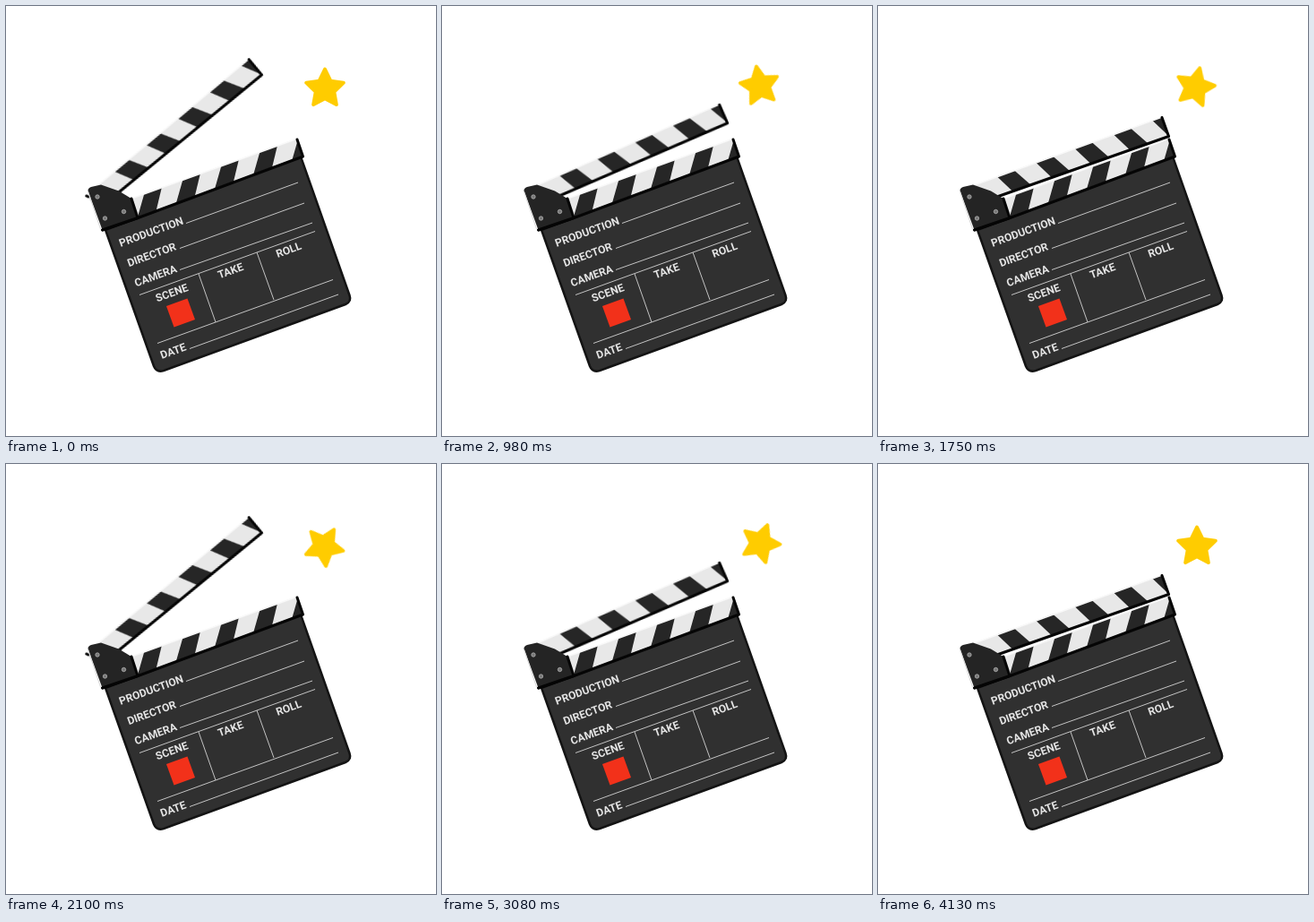
These frames come from a looping animation (480x480 px, 4.2 s). An HTML page:

```html
<!DOCTYPE html>
<html lang="en">
<head>
<meta charset="utf-8">
<title>Clapperboard</title>
<style>
  html, body { margin: 0; width: 100%; height: 100%; overflow: hidden; background: #fff; }
  svg { display: block; width: 100vw; height: 100vh; }
  .arm {
    transform-origin: 110.5px 222px;
    animation: clap 4200ms steps(5, end) infinite;
  }
  .star {
    transform-origin: 356px 90.5px;
    animation: spin 4200ms steps(60, jump-none) infinite;
  }
  /* Eleven swings, then the arm rests closed */
  @keyframes clap {
    0%, 16.66667%, 33.33333%, 50%, 66.66667%, 83.33333% { transform: rotate(-20deg); }
    8.33333%, 25%, 41.66667%, 58.33333%, 75%, 91.66667%, 100% { transform: rotate(0deg); }
  }
  @keyframes spin {
    from { transform: rotate(0deg); }
    to { transform: rotate(3600deg); }
  }
  .labels {
    font: 700 12.1px Roboto, "Liberation Sans", sans-serif;
    fill: #e4e4e4;
    text-anchor: middle;
  }
  .rules { stroke: #c4c4c4; stroke-width: 1; fill: none; }
  .white { fill: #e8e8e8; }
  .black { fill: #262626; }
  .edge { fill: none; stroke: #050505; stroke-width: 3; stroke-linejoin: round; stroke-linecap: round; }
  .shine { fill: none; stroke: #f9f9f9; stroke-width: 1.5; }
</style>
</head>
<body>
<svg viewBox="0 0 480 480">
  <defs>
    <path id="armShape" d="M94 204.500 L317.500 123.500 L325.500 145 L101 225 Z"/>
    <path id="barShape" d="M138 215.500 L324.500 148 L331.500 167 L146 236 Z"/>
    <clipPath id="armClip"><use href="#armShape"/></clipPath>
    <clipPath id="barClip"><use href="#barShape"/></clipPath>
    <path id="armStripe" d="M132 189.500 L151 182.500 L171 200 L152 208.500 Z"/>
    <path id="barStripe" d="M154.500 209 L174 202 L167.500 229 L146.500 237 Z"/>
  </defs>

  <path d="M111 250 L329 168 L383.500 323 Q386 330 379 333 L176 407 Q168 409.500 165 402 Z"
        fill="#303030" stroke="#141414" stroke-width="2.500"/>

  <path class="rules" d="M201 242.500 L326 197 M194 270.500 L333 220 M194 294.500 L342 242
    M149 322.500 L345 251.500 M215 299 L234 353 M280 275 L299 328
    M169 376.500 L365 305.500 M205 382.500 L371 322"/>

  <g class="labels">
    <text transform="translate(162 252) rotate(-20)" dy=".355em">PRODUCTION</text>
    <text transform="translate(162.500 277.500) rotate(-20)" dy=".355em">DIRECTOR</text>
    <text transform="translate(167 301) rotate(-20)" dy=".355em">CAMERA</text>
    <text transform="translate(185 320) rotate(-20)" dy=".355em">SCENE</text>
    <text transform="translate(250.500 295.500) rotate(-20)" dy=".355em">TAKE</text>
    <text transform="translate(315.500 272) rotate(-20)" dy=".355em">ROLL</text>
    <text transform="translate(186.500 385) rotate(-20)" dy=".355em">DATE</text>
  </g>

  <rect x="-12.500" y="-12.500" width="25" height="25" fill="#f2311a"
        transform="translate(195 342.500) rotate(-20)"/>

  <g>
    <use href="#barShape" class="white"/>
    <g class="black" clip-path="url(#barClip)">
      <use href="#barStripe"/>
      <use href="#barStripe" x="43" y="-15.500"/>
      <use href="#barStripe" x="86" y="-31"/>
      <use href="#barStripe" x="129" y="-46.500"/>
      <use href="#barStripe" x="172" y="-62"/>
    </g>
    <path class="shine" d="M140 215 L324 148.500"/>
    <path class="edge" d="M108 250 L146 237 L331.500 168 L325 149"/>
  </g>

  <g class="arm">
    <use href="#armShape" class="white"/>
    <g class="black" clip-path="url(#armClip)">
      <use href="#armStripe"/>
      <use href="#armStripe" x="43.500" y="-15.500"/>
      <use href="#armStripe" x="87" y="-31"/>
      <use href="#armStripe" x="130.500" y="-46.500"/>
      <use href="#armStripe" x="174" y="-62"/>
    </g>
    <path class="shine" d="M95 204.500 L317 124"/>
    <path class="edge" d="M130 214 L324.500 145.500 L317 124.500 M94.500 205.500 L96 207"/>
  </g>

  <path d="M91.500 206 Q91.500 203.500 95 202 L106 199.500 L126 206.500 L140 215 L147 236.500 L107.500 250 Z" fill="#242424"/>
  <path d="M140 215 L147 236.500 L107.500 250" class="edge" stroke-width="2"/>
  <path d="M91.500 207 L105.500 249" fill="none" stroke="#d8d8d8" stroke-width="1"/>
  <g fill="#777" stroke="#b0b0b0" stroke-width=".8">
    <circle cx="102" cy="213" r="2.200"/>
    <circle cx="110.500" cy="237" r="2.200"/>
    <circle cx="131.500" cy="229.500" r="2.200"/>
  </g>

  <g class="star">
    <path id="star" fill="#fc0" stroke="#fc0" stroke-width="4" stroke-linejoin="round"/>
  </g>
</svg>
<script>
  const points = Array.from({ length: 10 }, (_, i) => {
    const radius = i % 2 ? 10.8 : 21.8;
    const angle = i * Math.PI / 5;
    return `${356 + radius * Math.sin(angle)} ${92.4 - radius * Math.cos(angle)}`;
  });
  document.getElementById("star").setAttribute("d", `M${points.join("L")}Z`);
</script>
</body>
</html>
```
